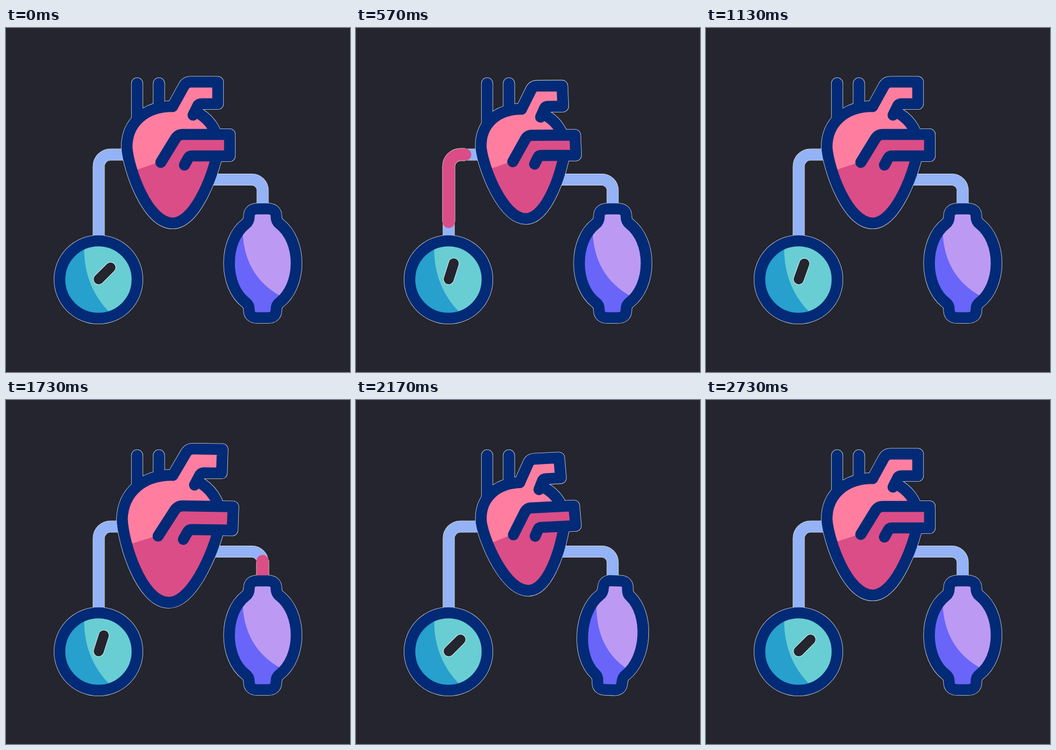
These frames come from a looping animation (640 by 640 pixels, 2.9 s). An HTML page with a canvas:

```html
<!DOCTYPE html>
<html>
<head>
<meta charset="utf-8">
<style>
html, body { margin: 0; height: 100%; overflow: hidden; background: #24252e; }
canvas { display: block; width: 100vmin; height: 100vmin; }
</style>
</head>
<body>
<canvas width="640" height="640"></canvas>
<script>
const ctx = document.querySelector('canvas').getContext('2d');
const BACK = '#24252e', NAVY = '#032a76', PIPE = '#94b3f6', BLOOD = '#db4d87', PINK = '#ff7ea0';
const RIM = 'rgba(255,255,255,.85)';
const LOOP = 2900, LINE = 20.6;
const path = d => new Path2D(d);

const leftPipe = path('M172.5 390V258A22 22 0 0 1 194.500 235.500H260');
const rightPipe = path('M477.500 337V302A20 20 0 0 0 457.500 282H370');
const veins = path('M244 103V190M284.500 103V160');

const body = path('M360.700 160.100C381.700 173.500 395 195.600 395 222C391 258 355 363 310 363C263 363 228 262 225 222C225 175 260 146 310 146');
const bodyShade = path('M200 278L290 248L345 238H430V420H200Z');
const upper = path('M310 146L331 108Q335 100.500 344 100.500H394V141H364Q359 141 357 144L348 162');
const lower = path('M288 250L315 206Q320 198 329 198H416V238H346Q341 238 339 242L332 255');

const gauge = path('M244 468A72 72 0 1 1 100 468A72 72 0 1 1 244 468Z');
const gaugeShade = path('M146 395Q140 480 198 534L90 550V395Z');

const bulb = path('M477.500 336.500H486.500Q502.500 336.500 502.500 350Q502.500 360 509 364.500C529 380 540 408 540 437.500S529 495 509 510.500Q502.500 515 502.500 525Q502.500 539 486.500 539H468.500Q452.500 539 452.500 525Q452.500 515 446 510.500C426 495 415.500 467 415.500 437.500S426 380 446 364.500Q452.500 360 452.500 350Q452.500 336.500 468.500 336.500Z');
const bulbShade = path('M440 370Q440 461 513 500V560H390V370Z');

// Keys are [time, ...values]
const REST = [1, 0, 0, 1, 310, 260];
const beatKeys = [
  [0, ...REST],
  [200, 1.075, .017, -.038, 1.09, 306.2, 264.3],
  [330, 1.11, .052, -.07, 1.1, 305.2, 265],
  [570, .92, -.005, .038, .94, 312.3, 258],
  [640, .912, -.046, .08, .925, 313.7, 259],
  [1070, ...REST]
];
const needleKeys = [
  [0, 45], [190, -37], [330, 15], [430, 43], [570, 18], [740, -31], [940, 44], [1130, 20],
  [1310, -33], [1520, 43], [1730, 18], [1900, -29], [2170, 45], [2370, -22], [2530, 42], [2700, -27]
];
const squeezeKeys = [[1740, 0], [2200, 1], [2730, 0]];

// Smooth curve through the keys, at rest at both ends
function spline(keys, t) {
  const last = keys.length - 1;
  if (t <= keys[0][0]) return keys[0].slice(1);
  if (t >= keys[last][0]) return keys[last].slice(1);
  const i = keys.findIndex(k => k[0] > t) - 1;
  const a = keys[i], b = keys[i + 1], span = b[0] - a[0], u = (t - a[0]) / span;
  const slope = (n, j) => n === 0 || n === last ? 0
    : (keys[n + 1][j] - keys[n - 1][j]) / (keys[n + 1][0] - keys[n - 1][0]) * span;
  return a.slice(1).map((v, k) => {
    const j = k + 1, s = u * u * (3 - 2 * u);
    return v + (b[j] - v) * s + slope(i, j) * u * (1 - u) ** 2 - slope(i + 1, j) * u * u * (1 - u);
  });
}

function ease(t, start, end) {
  const u = Math.min(1, Math.max(0, (t - start) / (end - start)));
  return u * u * (3 - 2 * u);
}

function moved(shape, matrix) {
  const p = new Path2D();
  p.addPath(shape, matrix);
  return p;
}

function stroke(shape, color, width = LINE) {
  ctx.strokeStyle = color;
  ctx.lineWidth = width;
  ctx.stroke(shape);
}

function fill(shape, color, shade, shadeColor) {
  ctx.fillStyle = color;
  ctx.fill(shape);
  if (!shade) return;
  ctx.save();
  ctx.clip(shape);
  ctx.fillStyle = shadeColor;
  ctx.fill(shade);
  ctx.restore();
}

function flow(pipe, tail, head) {
  if (head - tail < 1) return;
  ctx.setLineDash([head - tail, 999]);
  ctx.lineDashOffset = -tail;
  ctx.lineCap = 'butt';
  stroke(pipe, RIM, 24);
  ctx.lineCap = 'round';
  stroke(pipe, BLOOD, 22.6);
  ctx.setLineDash([]);
}

function draw(t) {
  const beat = new DOMMatrix(spline(beatKeys, t < 1300 ? t : t - 1530)).translate(-310, -260);
  const [b, bs, u, l] = [body, bodyShade, upper, lower].map(p => moved(p, beat));
  const q = spline(squeezeKeys, t)[0];
  const squeeze = new DOMMatrix([1 - .1 * q, .035 * q, -.06 * q, 1, 477.5, 437.5]).translate(-477.5, -437.5);
  const [bag, bagShade] = [bulb, bulbShade].map(p => moved(p, squeeze));

  ctx.fillStyle = BACK;
  ctx.fillRect(0, 0, 640, 640);
  ctx.lineCap = ctx.lineJoin = 'round';

  // Thin pale rim round every outer edge
  for (const p of [leftPipe, rightPipe, veins, b, u, l, gauge, bag]) stroke(p, RIM, LINE + 1.6);

  stroke(leftPipe, PIPE);
  stroke(rightPipe, PIPE);
  flow(leftPipe, 205 * ease(t, 450, 960), 205 * ease(t, 160, 700));
  flow(rightPipe, 150 * ease(t, 1770, 2160), 150 * ease(t, 1600, 2000));

  stroke(veins, NAVY);
  fill(b, PINK, bs, BLOOD);
  stroke(b, NAVY);
  fill(u, PINK);
  stroke(u, NAVY);
  fill(l, BLOOD);
  stroke(l, NAVY);

  fill(gauge, '#68ced3', gaugeShade, '#27a0ce');
  stroke(gauge, NAVY);
  const angle = (t < 2715 ? spline(needleKeys, t)[0] : 45) * Math.PI / 180;
  const needle = new Path2D();
  needle.moveTo(172.5, 467.5);
  needle.lineTo(172.5 + 31 * Math.sin(angle), 467.5 - 31 * Math.cos(angle));
  stroke(needle, '#fff', 20.4);
  stroke(needle, BACK, 18.8);

  fill(bag, '#bc9af3', bagShade, '#6965f8');
  stroke(bag, NAVY);
}

const begin = performance.now();
function tick() {
  draw((performance.now() - begin) % LOOP);
  requestAnimationFrame(tick);
}
tick();
</script>
</body>
</html>
```
